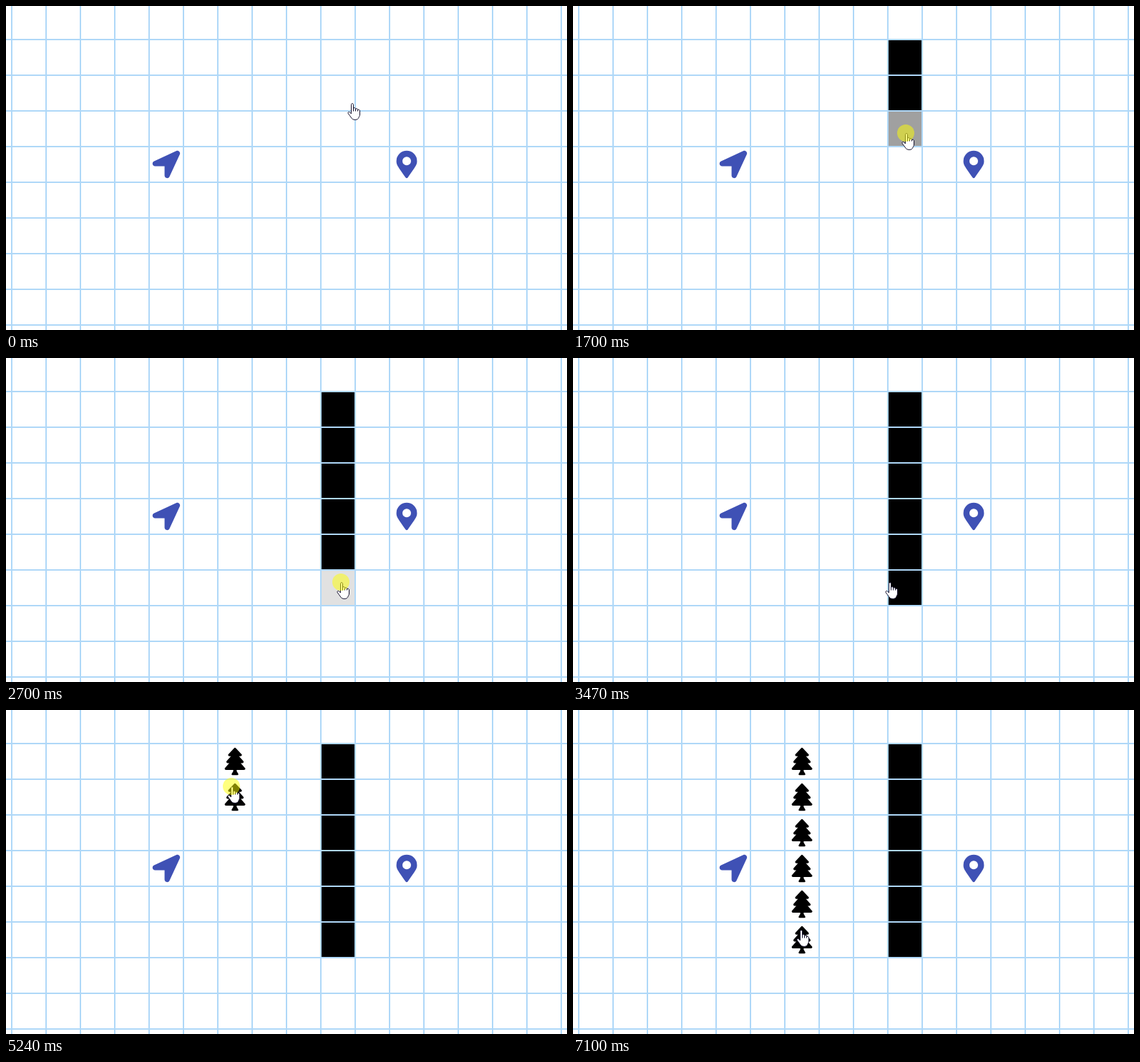
Animation of 784x454 px, one loop 7180 ms. Source, as an HTML page:

```html
<!DOCTYPE html>
<html lang="en">
<head>
<meta charset="utf-8">
<title>Drawing walls and trees on a grid</title>
<style>
  html, body { margin: 0; width: 100%; height: 100%; overflow: hidden; background: #fff; }
  svg { display: block; width: 784px; height: 454px; }
</style>
</head>
<body>
<svg viewBox="0 0 784 454">
  <defs>
    <pattern id="grid" x="7" y="46" width="48" height="50" patternUnits="userSpaceOnUse">
      <path d="M0 0H48V2H2V50H0Z" fill="#afd8f8"/>
    </pattern>
    <g id="tree" transform="scale(.075)">
      <path d="M0 25L105 137H26L137 265H55L169 393H-169L-55 265H-137L-26 137H-105Z"
        stroke="#000" stroke-width="46" stroke-linejoin="round"/>
      <path d="M-32 400H32V440L62 489Q68 512 48 512H-48Q-68 512 -62 489L-32 440Z"/>
    </g>
  </defs>
  <rect width="784" height="454" fill="url(#grid)"/>
  <g fill="#3f51b5">
    <path transform="translate(204.8 202.8) scale(.075)"
      d="M444.5 3.5L28.7 195.4c-48 22.4-32 92.8 19.2 92.8h175.9v175.9c0 51.2 70.4 67.2 92.8 19.2l191.9-415.8c16-38.4-25.6-80-64-64z"/>
    <path transform="translate(545.6 202.8) scale(.075)" fill-rule="evenodd"
      d="M172.3 501.7C27 291 0 269.4 0 192a192 192 0 0 1 384 0c0 77.4-27 99-172.3 309.7-9.5 13.8-29.9 13.8-39.4 0zM112 192a80 80 0 1 0 160 0a80 80 0 1 0-160 0z"/>
  </g>
  <g id="walls"></g>
  <g id="trees"></g>
  <g id="pointer">
    <path fill="#fff" stroke="#14102c" stroke-linejoin="round"
      d="M-.5 13.5V2.3c0-2.2 3-2.2 3 0V8c0-2 3-1.9 3 .2V9c.2-1.8 3-1.6 3 .4v.9c.3-1.6 3-1.4 3 .6V16c0 2-1 2.8-1.5 4.2-.8 2-2 3.2-5 3.2-3.3 0-4.6-1.3-5.8-3.3-1.3-2.1-2.5-3.3-3.9-5.3-1.2-1.8.9-3.2 2.3-1.9L-.5 15z"/>
    <path fill="none" stroke="#14102c" d="M2.5 8v3.5M5.5 9v2.5M8.5 10v1.5"/>
    <circle id="press" r="12" fill="#ff0" fill-opacity=".5"/>
  </g>
</svg>
<script>
  const LOOP = 7180, FIRST = 170, STEP = 1000 / 13;
  const ROWS = 6, LAG = 75, FADE = 400;

  const linear = p => p;
  const easeOut = p => Math.sin(p * Math.PI / 2);
  const easeInOut = p => p * p * (3 - 2 * p);

  // Each move starts where the previous one ended.
  const home = { x: 483, y: 136 };
  const wallDrag = { from: 940, to: 2785, x: 468, y: 324, ease: linear, down: 705, up: 3010 };
  const treeDrag = { from: 5015, to: 6745, x: 318, y: 308, ease: linear, down: 4860, up: 7090 };
  const moves = [
    { from: 90, to: 480, x: 463, y: 73, ease: easeInOut },
    wallDrag,
    { from: 3400, to: 3477, x: 442, y: 314, ease: linear },
    { from: 3477, to: 4170, x: 314, y: 130, ease: linear },
    { from: 4170, to: 4710, x: 315, y: 76, ease: easeOut },
    treeDrag
  ];
  moves.forEach((move, i) => move.start = i ? moves[i - 1] : home);

  const clamp = p => Math.min(1, Math.max(0, p));
  const progress = (t, from, to) => clamp((t - from) / (to - from));
  const rowTop = row => 47 + 50 * row;

  // A cell is marked shortly after the pressed pointer enters it.
  function markTime(drag, row) {
    if (row === 0) return drag.down + LAG;
    const p = progress(rowTop(row), drag.start.y, drag.y);
    return drag.from + (drag.to - drag.from) * p + LAG;
  }

  function pointerAt(t) {
    let { x, y } = home;
    for (const move of moves) {
      const p = move.ease(progress(t, move.from, move.to));
      x += (move.x - move.start.x) * p;
      y += (move.y - move.start.y) * p;
    }
    return [Math.round(x), Math.round(y)];
  }

  const byId = id => document.getElementById(id);
  function addRows(parent, tag, attrsFor, drag) {
    return Array.from({ length: ROWS }, (_, row) => {
      const el = document.createElementNS('http://www.w3.org/2000/svg', tag);
      for (const [key, value] of Object.entries(attrsFor(row))) el.setAttribute(key, value);
      return { el: byId(parent).appendChild(el), time: markTime(drag, row) };
    });
  }
  const walls = addRows('walls', 'rect',
    row => ({ x: 441, y: rowTop(row) + 1, width: 46, height: 48 }), wallDrag);
  const trees = addRows('trees', 'use',
    row => ({ href: '#tree', transform: `translate(320 ${rowTop(row) + 5.8})` }), treeDrag);

  const fade = (el, opacity) => el.setAttribute('opacity', opacity);

  function draw(elapsed) {
    // The picture advances 13 times a second.
    const step = Math.max(-1, Math.floor((elapsed % LOOP - FIRST + 10) / STEP));
    const t = FIRST + step * STEP;
    for (const { el, time } of walls) fade(el, progress(t, time, time + FADE));
    for (const { el, time } of trees) fade(el, t >= time ? 1 : 0);
    byId('pointer').setAttribute('transform', `translate(${pointerAt(t)})`);
    fade(byId('press'), [wallDrag, treeDrag].some(({ down, up }) => t >= down && t < up) ? 1 : 0);
  }

  const origin = performance.now();
  function tick() {
    draw(performance.now() - origin);
    requestAnimationFrame(tick);
  }
  tick();
</script>
</body>
</html>
```
